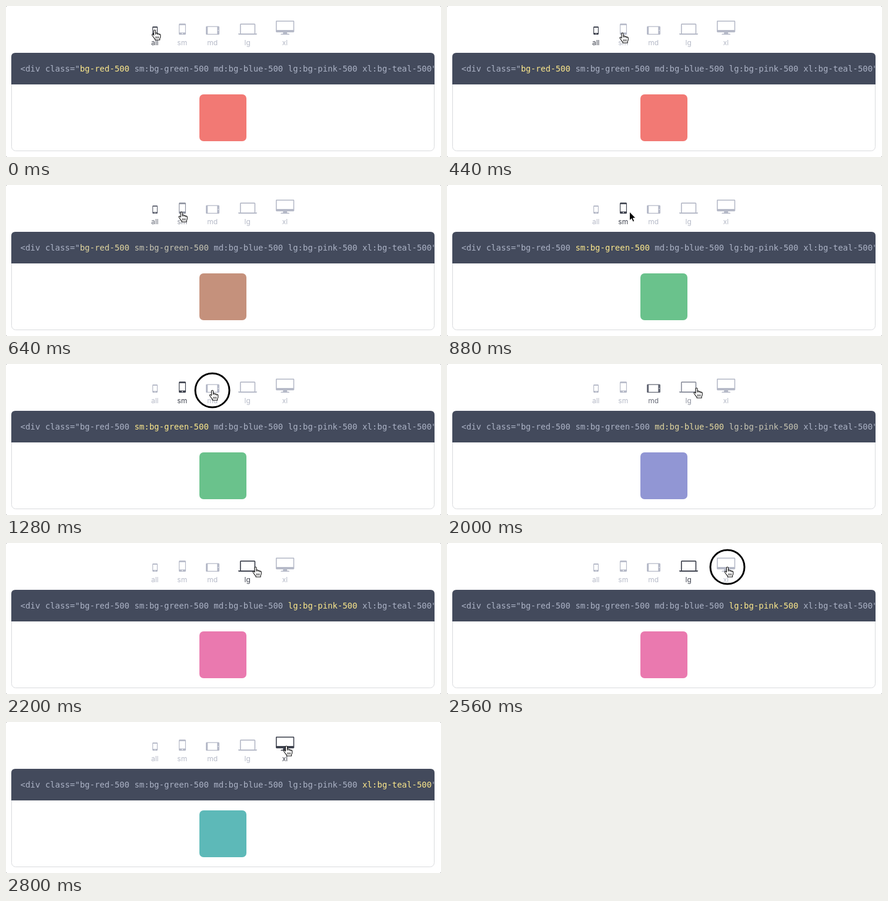
Write an HTML page that moves like this. It is 740 px wide and 258 px high and loops after 2.92 s.

```html
<!DOCTYPE html>
<html lang="en">
<head>
<meta charset="utf-8">
<title>Responsive classes</title>
<style>
html, body { margin: 0; width: 100%; height: 100%; overflow: hidden; background: #888; }
svg { display: block; }
.label { font: 12px Inter, sans-serif; text-anchor: middle; }
.code { font: 14px "DejaVu Sans Mono", monospace; white-space: pre; fill: #abb2c5; }
.item, .item * { fill: currentColor; }
.item .hole { fill: #fff; }
.item .line { fill: #fff; stroke: currentColor; stroke-width: 1.7; }
</style>
</head>
<body>
<svg width="740" height="258" viewBox="0 0 740 258">
  <rect width="740" height="258" rx="2" fill="#fff"/>
  <g class="item">
    <rect x="249" y="35" width="9" height="14" rx="1.4"/>
    <rect class="hole" x="250.2" y="37" width="6.6" height="9"/>
    <circle class="hole" cx="253.5" cy="47.5" r=".7"/>
    <text class="label" x="253.2" y="67">all</text>
  </g>
  <g class="item">
    <rect x="294" y="30" width="12" height="19" rx="1.6"/>
    <rect class="hole" x="295.2" y="32.7" width="9.6" height="12.6"/>
    <circle class="hole" cx="300" cy="47.2" r=".9"/>
    <text class="label" x="299.8" y="67">sm</text>
  </g>
  <g class="item">
    <rect x="340" y="34.5" width="23" height="14.5" rx="1.6"/>
    <rect class="hole" x="343.2" y="35.8" width="16" height="11.9"/>
    <circle class="hole" cx="361.2" cy="41.7" r=".8"/>
    <text class="label" x="351.2" y="67">md</text>
  </g>
  <g class="item">
    <rect class="line" x="398.8" y="30.8" width="24.6" height="17" rx="1"/>
    <path d="M395 47H427V47.6Q427 49 425.5 49H396.5Q395 49 395 47.6Z"/>
    <text class="label" x="410.7" y="67">lg</text>
  </g>
  <g class="item">
    <rect x="459" y="25" width="31.3" height="20" rx="1.4"/>
    <rect class="hole" x="460.6" y="26.6" width="28.1" height="14.4"/>
    <path d="M471.5 45H478L478.6 47.6H482V49H467.5V47.6H471Z"/>
    <text class="label" x="474.4" y="67">xl</text>
  </g>
  <rect x="9.5" y="80.5" width="719" height="167" rx="7" fill="#fff" stroke="#d8dadd"/>
  <path d="M9 134V87Q9 80 16 80H722Q729 80 729 87V134Z" fill="#434a5c"/>
  <svg width="729" height="258"><text class="code" id="code" x="24.5" y="112"></text></svg>
  <rect id="box" x="329" y="151" width="80" height="80" rx="7"/>
  <g id="cursor">
    <circle id="ring" r="29" fill="none" stroke="#000" stroke-width="3"/>
    <path id="arrow" d="M0 0V15L3.4 11.8L5.7 17L8.2 15.9L6 10.9H10.6Z" fill="#000" stroke="#fff"/>
    <g id="hand" fill="#fff" stroke="#111" stroke-width="1.1" stroke-linejoin="round">
      <path d="M-1.5 1.4Q-1.5 0 0 0T1.5 1.4V5.8Q1.7 5 3 5.1T4.4 6.5Q5 5.8 6 6.1T7.2 7.4Q8.2 6.8 9 7.3T9.8 9V11Q9.8 13 8.6 14.5V17H.5V15.5Q-1.5 13.5 -3 11L-4.3 9.2Q-5 8 -4 7.4T-1.5 9Z"/>
      <path d="M1.5 5.8V8M4.4 6.5V8.4M7.2 7.4V9M2 11V14.5M4.2 11V14.5M6.4 11V14.5" stroke-width=".9"/>
    </g>
  </g>
</svg>
<script>
const LOOP = 2920, STEP = 40, PRESS = 120, FADE = 120;
const names = ['bg-red-500', 'sm:bg-green-500', 'md:bg-blue-500', 'lg:bg-pink-500', 'xl:bg-teal-500'];
const fills = [[242, 121, 116], [106, 194, 140], [100, 165, 230], [234, 121, 175], [93, 185, 184]];
const clicks = [-FADE, 600, 1320, 1960, 2680];
const zones = [[246, 260], [291, 309], [338, 364], [394, 428], [458, 492]];
// time, x, y of the pointer tip
const path = [
  [0, 253, 41], [40, 253, 41], [420, 298.5, 46], [790, 298.5, 46], [1080, 351, 45],
  [1360, 351, 45], [1680, 418, 45], [1800, 424.5, 41], [2200, 424.5, 41],
  [2240, 441, 41], [2400, 477, 41], [LOOP, 477, 41]
];
const $ = id => document.getElementById(id);
const items = document.querySelectorAll('.item');

$('code').innerHTML = '&lt;div class="' + names.map(n => `<tspan>${n}</tspan>`).join(' ') + '"&gt;&lt;/div&gt;';
const spans = document.querySelectorAll('tspan');

const clamp = v => Math.min(1, Math.max(0, v));
const lerp = (a, b, u) => a + (b - a) * u;
const mix = (a, b, u) => `rgb(${a.map((v, i) => Math.round(lerp(v, b[i], u)))})`;

function pointer(t) {
  const i = path.findIndex(k => k[0] > t);
  const [t0, x0, y0] = path[i - 1], [t1, x1, y1] = path[i];
  const u = (t - t0) / (t1 - t0), e = u * u * (3 - 2 * u);
  return [lerp(x0, x1, e), lerp(y0, y1, e)];
}

function draw(t) {
  const active = clicks.findLastIndex(c => t >= c);
  const u = clamp((t - clicks[active]) / FADE);
  items.forEach((item, i) => {
    const level = i === active ? u : i === active - 1 ? 1 - u : 0;
    item.style.color = mix([182, 186, 200], [62, 66, 78], level);
    spans[i].style.fill = mix([171, 178, 197], [252, 232, 140], level);
  });
  $('box').style.fill = mix(fills[Math.max(0, active - 1)], fills[active], u);

  const [x, y] = pointer(t);
  const over = zones.some(([a, b]) => x >= a && x <= b);
  const pressed = clicks.some(c => c > 0 && t >= c - PRESS && t < c);
  $('cursor').setAttribute('transform', `translate(${x} ${y})`);
  $('hand').style.display = over ? '' : 'none';
  $('arrow').style.display = over ? 'none' : '';
  $('ring').style.display = pressed ? '' : 'none';
}

const start = performance.now();
function tick() {
  const t = (performance.now() - start) % LOOP;
  draw(Math.floor(t / STEP) * STEP);
  requestAnimationFrame(tick);
}
tick();
</script>
</body>
</html>
```
